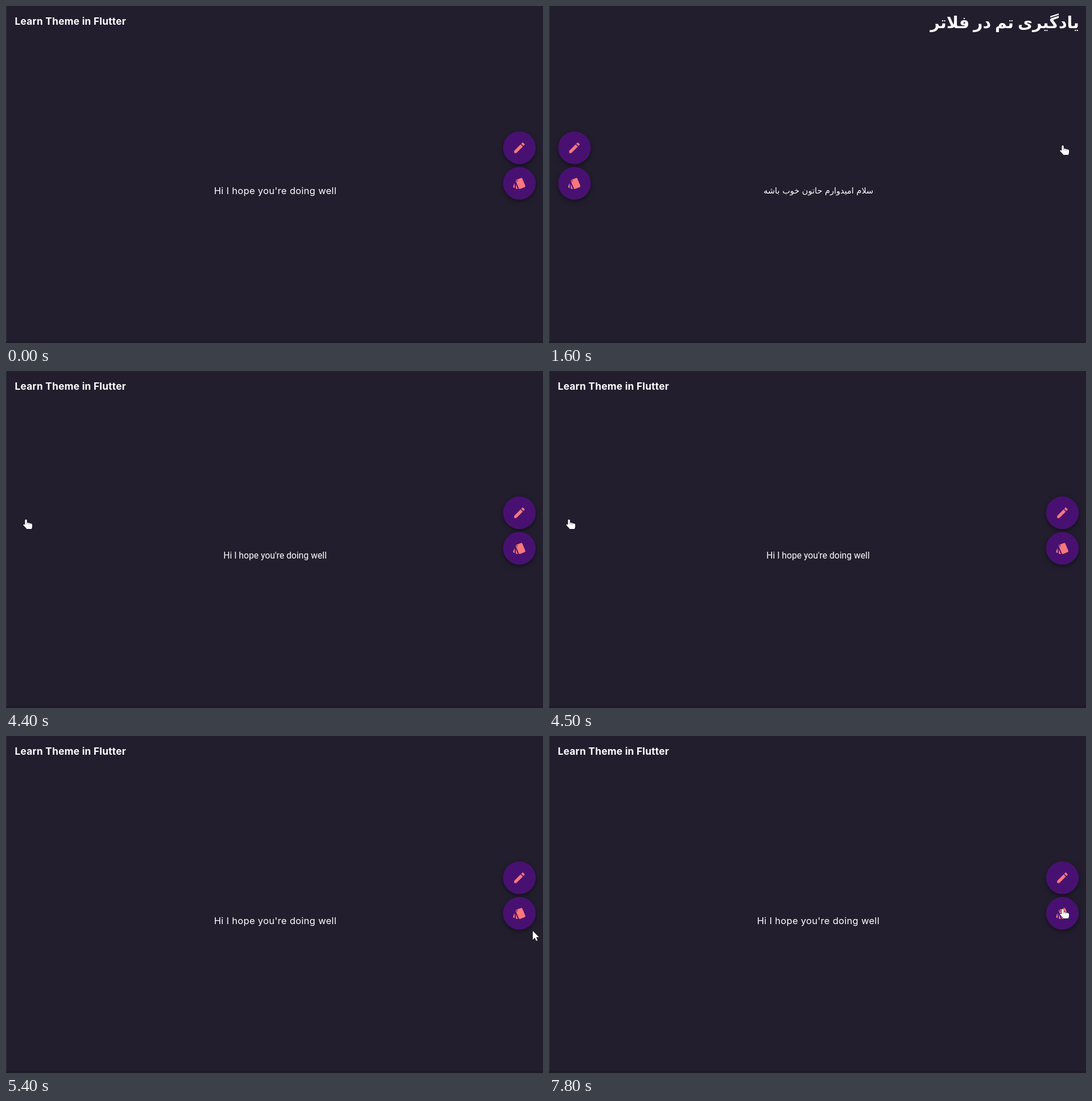
These frames come from a looping animation (944x593 px, 8 s). An HTML page:

```html
<!DOCTYPE html>
<html lang="en">
<head>
<meta charset="utf-8">
<title>Learn Theme in Flutter</title>
<style>
  html, body { margin: 0; width: 100%; height: 100%; overflow: hidden; background: #221e2e; }
  svg { display: block; width: 944px; height: 593px; }
  text { fill: #fff; }
  .title { font: 700 17.3px Inter, sans-serif; letter-spacing: .26px; }
  .body { text-anchor: middle; }
  .wide { font: 400 16.5px Inter, sans-serif; letter-spacing: .3px; }
  .plain { font: 400 15.7px Roboto, sans-serif; }
  .fa { direction: rtl; font-family: "DejaVu Sans", sans-serif; }
  .fa.title { font-size: 28.5px; letter-spacing: 0; word-spacing: -3px; }
  .fa.body { font-size: 14.5px; }
  .fab { filter: drop-shadow(0 3px 3px rgba(0, 0, 0, .3)) drop-shadow(0 3px 5px rgba(0, 0, 0, .16)); }
  .cursor { fill: #fff; stroke: #15131c; stroke-width: 1.4; stroke-linejoin: round; paint-order: stroke; }
</style>
</head>
<body>
<svg viewBox="0 0 944 593">
  <rect width="944" height="593" fill="#221e2e"/>
  <rect width="1" height="593" fill="#35323d"/>
  <rect y="590" width="944" height="3" fill="#1e1a28"/>

  <g id="en">
    <text class="title" x="15.5" y="33.3">Learn Theme in Flutter</text>
    <text id="wide" class="body wide" x="473.4" y="331">Hi I hope you're doing well</text>
    <text id="plain" class="body plain" x="473" y="329.5">Hi I hope you're doing well</text>
  </g>
  <g id="fa">
    <text class="fa title" x="932" y="39">یادگیری تم در فلاتر</text>
    <text class="fa body" x="473.7" y="330">سلام امیدوارم حاتون خوب باشه</text>
  </g>

  <g id="fabs" fill="#fb777d">
    <g transform="translate(0 249.5)">
      <circle class="fab" r="28.7" fill="#481171"/>
      <path transform="scale(1.025) translate(-12 -12)" d="M3 17.25V21h3.75L17.81 9.94l-3.75-3.75zM20.71 7.04c.39-.39.39-1.02 0-1.41l-2.34-2.34c-.39-.39-1.02-.39-1.41 0l-1.83 1.83 3.75 3.75z"/>
    </g>
    <g transform="translate(0 312)">
      <circle class="fab" r="28.7" fill="#481171"/>
      <g transform="scale(1.025) translate(-12 -12)">
        <rect x="-6" y="-8.5" width="12" height="17" rx="2" transform="translate(14.02 12.25) rotate(-22.5)"/>
        <circle cx="7.88" cy="7.75" r="1" fill="#481171"/>
        <path d="M2.53 19.65l1.34.56v-9.03l-2.43 5.86c-.41 1.02.08 2.19 1.09 2.61zM5.88 19.75c0 1.1.9 2 2 2h1.45l-3.45-8.34z"/>
      </g>
    </g>
  </g>

  <g id="hand" class="cursor">
    <path d="M5.1.3c1 0 1.7.7 1.7 1.7v4.1c.7-.5 2-.4 2.5.4.8-.4 2-.2 2.4.6 1-.3 2 0 2.4.6 1-.2 2 .4 2 1.7v3c0 2-.9 2.9-1.1 4.6H6.2C5.4 14.8 2.2 12.6.5 10.3c-.7-1.2.7-2.2 1.9-1.3l1 .8V2C3.4 1 4.1.3 5.1.3z"/>
    <path d="M6.8 6v3M9.4 6.6v2.6M11.8 7.2v2.2" fill="none" stroke-width=".7" opacity=".6"/>
  </g>
  <path id="arrow" class="cursor" d="M0 0v15.5l3.6-3.4 2.4 5.4 2.5-1.1-2.4-5.3h4.9z"/>
</svg>
<script>
  const LOOP = 8000;
  // start, language, body font, pointer, x, y
  const steps = [
    [0, 'en', 'wide', '', 0, 0],
    [1100, 'en', 'wide', 'hand', 898, 245],
    [1600, 'fa', '', 'hand', 898, 245],
    [4100, 'fa', '', 'hand', 30, 261],
    [4400, 'en', 'plain', 'hand', 30, 261],
    [4800, 'en', 'wide', 'hand', 30, 261],
    [5300, 'en', 'wide', 'arrow', 560, 322],
    [5400, 'en', 'wide', 'arrow', 926, 343],
    [5500, 'en', 'wide', 'hand', 893, 311],
    [7800, 'en', 'wide', 'hand', 898, 304]
  ];
  const el = id => document.getElementById(id);
  const show = (id, on) => el(id).style.display = on ? '' : 'none';
  const place = (id, x, y) => el(id).setAttribute('transform', `translate(${x} ${y})`);
  let current;

  function draw() {
    const t = performance.now() % LOOP;
    const step = steps.findLast(s => s[0] <= t);
    if (step !== current) {
      current = step;
      const [, lang, font, pointer, x, y] = step;
      ['en', 'fa'].forEach(id => show(id, id === lang));
      ['wide', 'plain'].forEach(id => show(id, id === font));
      ['hand', 'arrow'].forEach(id => show(id, id === pointer));
      place('fabs', lang === 'en' ? 902.5 : 44.7, 0);
      if (pointer) place(pointer, x, y);
    }
    requestAnimationFrame(draw);
  }
  draw();
</script>
</body>
</html>
```
